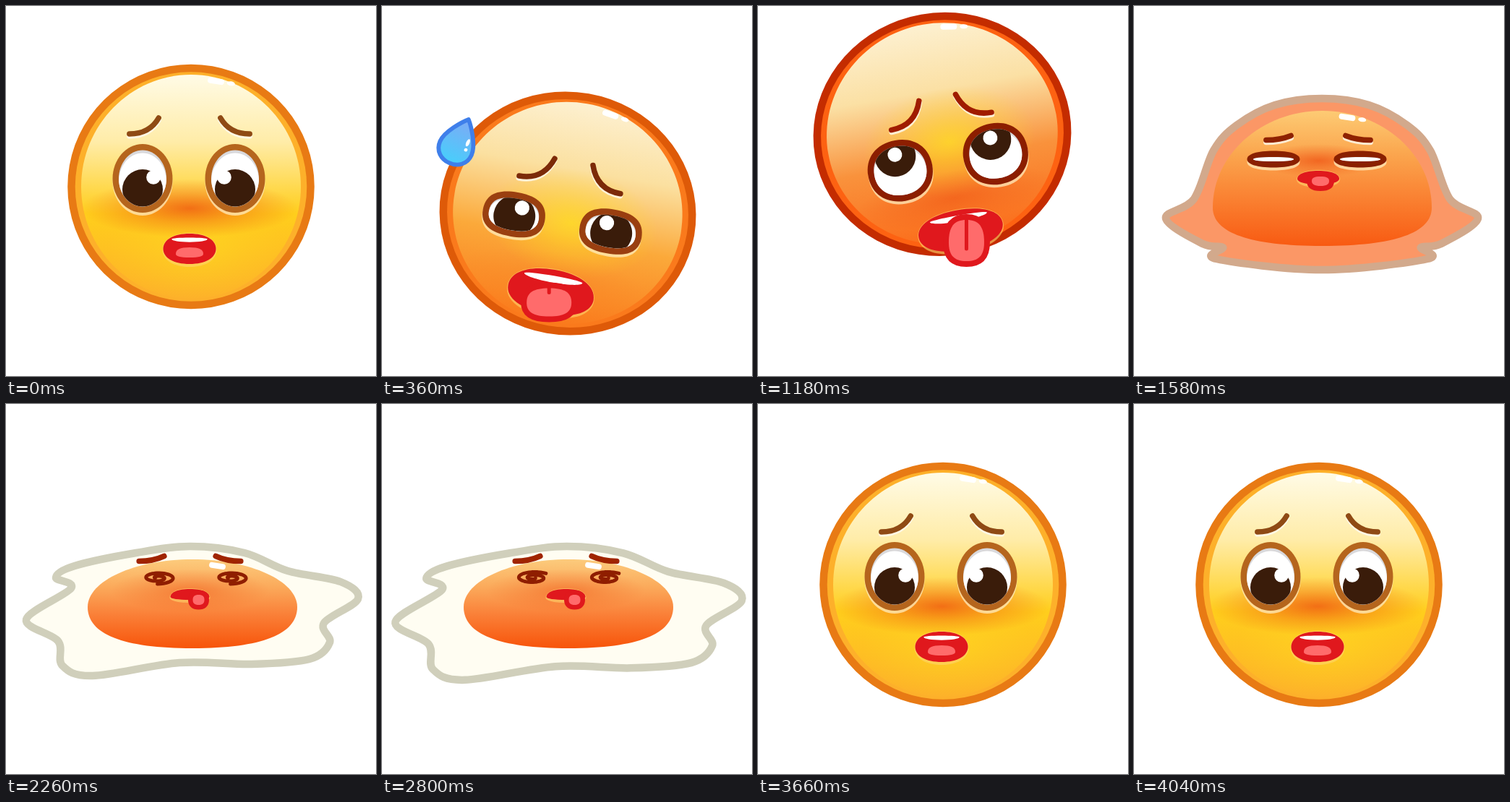
An HTML page with a canvas that plays this animation: 512 px wide and 512 px high, repeating every 4080 ms.

```html
<!DOCTYPE html>
<html lang="en">
<head>
<meta charset="utf-8">
<title>Melting face</title>
<style>
html, body { margin: 0; width: 100%; height: 100%; overflow: hidden; background: #fff; }
canvas { display: block; width: 512px; height: 512px; }
</style>
</head>
<body>
<canvas id="stage" width="512" height="512"></canvas>
<script>
const ctx = document.getElementById('stage').getContext('2d');
const LOOP = 4080, STEP = 20, RAD = Math.PI / 180;

// All outlines run clockwise from the top with the same point count, so they can morph.
const POINTS = 18;

function ring({ x, y, tilt, w, up }) {
  const c = Math.cos(tilt * RAD), s = Math.sin(tilt * RAD);
  return Array.from({ length: POINTS }, (_, i) => {
    const a = i / POINTS * 2 * Math.PI;
    const dx = (w + 13.5) * Math.sin(a), dy = -(up + 9) * Math.cos(a);
    return [x + dx * c - dy * s, y + dx * s + dy * c];
  });
}

function mirrored(x, top, side, bottom) {
  return [[x, top], ...side.map(([d, y]) => [x + d, y]), [x, bottom],
    ...side.map(([d, y]) => [x - d, y]).reverse()];
}

const melt = mirrored(260, 128, [[65, 137], [118, 165], [150, 200], [177, 267],
  [216, 294], [165, 329], [137, 334], [146, 350]], 365);
const white = [[255, 197], [330, 206], [390, 231], [463, 246], [487, 270], [440, 303],
  [448, 330], [420, 353], [340, 360], [240, 358], [120, 376], [78, 362], [72, 328],
  [28, 298], [90, 255], [69, 240], [95, 224], [180, 206]];
const wide = white.map(([x, y]) => [258 + (x - 257) * 1.075, 197 + (y - 197) * 1.055]);

// Feature positions are offsets from the middle of the body, in its tilted frame.
const calm = {
  body: { x: 256, y: 250, tilt: 0, w: 152, up: 155, down: 155, sag: .55 },
  edge: '#e87a14', fill: '#fdb02a', ink: '#b5651d', browInk: '#8f4a14',
  shades: ['#fffbe6', '#ffeca8', '#ffce1c', '#fdb02a'],
  blush: { y: 30, w: 150, alpha: .75 }, glow: { y: 85, alpha: .5 },
  lean: -2, shine: .8, open: 1,
  eyes: { x: -3, y: -11, gap: 64, w: 41.5, up: 48, down: 47, round: .55,
    gazeX: 0, gazeY: 15, pupil: 28, inward: 15, glintY: -2 },
  brows: { y: -84, gap: 63, worry: 11 },
  mouth: { y: 86, w: 36.5, up: 21, down: 21, teeth: 1 },
  tongue: { x: 0, y: 7, w: 19, up: 9, down: 5, rim: 0, cleft: 0 }
};
const woozy = {
  ...calm,
  body: { x: 257, y: 287, tilt: 10, w: 159, up: 154, down: 153, sag: .55 },
  edge: '#de5a08', fill: '#fa7a1c', ink: '#9a3f10', browInk: '#7c2a08',
  shades: ['#fdf0d0', '#fbe0a0', '#fba93a', '#fa7a1c'],
  blush: { y: 90, w: 130, alpha: .1 }, glow: { y: 12, alpha: .75 },
  lean: -4,
  eyes: { x: -5, y: 15.5, gap: 68, w: 43.5, up: 32, down: 29.5, round: .67,
    gazeX: 1, gazeY: 1, pupil: 29, inward: 8.5, glintY: -12 },
  brows: { y: -55.5, gap: 49, worry: 16 },
  mouth: { y: 112, w: 60, up: 32, down: 30, teeth: 1 },
  tongue: { x: 0, y: 14, w: 31, up: 20, down: 19, rim: 8, cleft: 6 }
};
const panting = {
  ...woozy,
  body: { x: 255, y: 299, tilt: -10, w: 160, up: 154, down: 152, sag: .55 },
  edge: '#c42c00', fill: '#fd6212', ink: '#8c1e00', browInk: '#a01c00',
  shades: ['#fdf0d0', '#fbe0a4', '#f9923c', '#fb6c1a'],
  blush: { y: 90, w: 140, alpha: .5 },
  lean: 2,
  eyes: { x: 1, y: 39.5, gap: 67, w: 45, up: 42.5, down: 42.5, round: .6,
    gazeX: -3.5, gazeY: -21, pupil: 28.5, inward: 0, glintY: -23 },
  brows: { y: -34.5, gap: 48, worry: 16.5 },
  mouth: { y: 135, w: 59, up: 28, down: 28, teeth: 1 },
  tongue: { x: 5, y: 18, w: 24.5, up: 31, down: 26, rim: 8, cleft: 40 }
};
const melting = {
  ...panting,
  body: { x: 260.5, y: 279, tilt: 0, w: 151.5, up: 134, down: 53, sag: .66 },
  edge: '#d2a98c', fill: '#fb9766', ink: '#8a2000', browInk: '#8f2200',
  shades: ['#fdcb74', '#fba850', '#fa8434', '#f85a12'],
  blush: { y: -65, w: 85, alpha: .7 }, glow: { y: -60, alpha: 0 },
  lean: -5.5,
  eyes: { x: -7.5, y: -67, gap: 60, w: 36.5, up: 11.5, down: 11.5, round: .62,
    gazeX: 0, gazeY: 0, pupil: 0, inward: 0, glintY: 0 },
  brows: { y: -96.5, gap: 55, worry: 3 },
  mouth: { y: -40, w: 29, up: 11, down: 8, teeth: 0 },
  tongue: { x: 3, y: 3, w: 12, up: 6, down: 7, rim: 7, cleft: 0 }
};
const egg = {
  ...melting,
  body: { x: 258, y: 281, tilt: 0, w: 145, up: 66, down: 57, sag: .66 },
  edge: '#d0cfbb', fill: '#fffdf2', ink: '#8f1e00', browInk: '#a02400',
  shades: ['#fccb7c', '#fbab5c', '#fa8038', '#f7540a'],
  blush: { y: -23, w: 110, alpha: .45 },
  lean: -3.5, shine: 0, open: 0,
  eyes: { ...melting.eyes, x: 2, y: -40.5, gap: 50.5, w: 27, up: 11, down: 11 },
  brows: { y: -67, gap: 53, worry: 3.5 },
  mouth: { y: -14, w: 27, up: 11, down: 4, teeth: 0 },
  tongue: { x: 12, y: 4, w: 8, up: 7, down: 7, rim: 6.5, cleft: 0 }
};
const swell = {
  ...egg,
  body: { x: 258.5, y: 283, tilt: 0, w: 151, up: 100, down: 57, sag: .8 },
  shades: ['#fddd88', '#fcb868', '#fa8844', '#f7540a'],
  blush: { y: -38, w: 95, alpha: .4 },
  shine: .9,
  eyes: { ...egg.eyes, x: -9.5, y: -54.5, gap: 54, w: 31, up: 18, down: 18 },
  brows: { y: -84, gap: 56, worry: 3.5 },
  mouth: { y: -26, w: 27, up: 10, down: 4, teeth: 0 },
  tongue: { ...egg.tongue, y: 0, w: 0, up: 0, down: 0, rim: 0 }
};
for (const face of [calm, woozy, panting]) face.outline = ring(face.body);
melting.outline = melt;
egg.outline = white;
swell.outline = wide;
const spread = { ...egg, outline: wide };

const poses = [[0, calm], [80, calm], [360, woozy], [400, woozy], [560, panting], [1180, panting],
  [1580, melting], [1820, egg], [2260, egg], [3220, spread], [3340, swell], [3380, swell],
  [3560, calm], [LOOP, calm]];

// start, end, shift down, squash
const bounces = [[40, 180, -28, -.02], [180, 340, 14, .03], [820, 980, 10, .03],
  [980, 1500, -130, 0], [1600, 1900, 0, .03], [3460, 3660, -43, 0],
  [3660, 3840, 62, .1], [3840, 3960, -30, -.02], [3960, 4040, 5, .01]];

// start, x, y, size
const drops = [[175, 121, 168, 68], [700, 145, 144, 61], [800, 377, 399, 46]];
const DROP_LIFE = 370;

const channels = hex => [1, 3, 5].map(i => parseInt(hex.slice(i, i + 2), 16));

function mix(a, b, k) {
  if (a === b) return a;
  if (typeof a === 'number') return a + (b - a) * k;
  if (typeof a === 'string') {
    return `rgb(${mix(channels(a), channels(b), k).map(Math.round)})`;
  }
  if (Array.isArray(a)) return a.map((v, i) => mix(v, b[i], k));
  return Object.fromEntries(Object.keys(a).map(n => [n, mix(a[n], b[n], k)]));
}

function poseAt(t) {
  const i = poses.findIndex(([start], n) => n && t < start);
  const [t0, a] = poses[i - 1], [t1, b] = poses[i];
  const k = (t - t0) / (t1 - t0);
  return mix(a, b, k * k * (3 - 2 * k));
}

function bounceAt(t) {
  const now = bounces.find(([t0, t1]) => t >= t0 && t < t1);
  if (!now) return [0, 0];
  const [t0, t1, shift, squash] = now;
  const arc = Math.sin((t - t0) / (t1 - t0) * Math.PI);
  return [shift * arc, squash * arc];
}

function layer(draw, alpha = 1) {
  if (alpha < .01) return;
  ctx.save();
  ctx.globalAlpha *= alpha;
  draw();
  ctx.restore();
}

function place(x, y, deg) {
  ctx.translate(x, y);
  ctx.rotate(deg * RAD);
}

function paint(color) {
  ctx.fillStyle = color;
  ctx.fill();
}

function stroke(color, width) {
  ctx.strokeStyle = color;
  ctx.lineWidth = width;
  ctx.stroke();
}

function dot(x, y, r, color) {
  ctx.beginPath();
  ctx.arc(x, y, r, 0, 7);
  paint(color);
}

// Two half ovals of different height around a shared waist.
function oval(x, y, w, up, down, k = .55, kDown = k) {
  ctx.beginPath();
  ctx.moveTo(x - w, y);
  ctx.bezierCurveTo(x - w, y - up * k, x - w * k, y - up, x, y - up);
  ctx.bezierCurveTo(x + w * k, y - up, x + w, y - up * k, x + w, y);
  ctx.bezierCurveTo(x + w, y + down * kDown, x + w * kDown, y + down, x, y + down);
  ctx.bezierCurveTo(x - w * kDown, y + down, x - w, y + down * kDown, x - w, y);
  ctx.closePath();
}

// Smooth closed curve through the points.
function blob(points) {
  const at = i => points[(i + POINTS) % POINTS];
  ctx.beginPath();
  ctx.moveTo(...points[0]);
  points.forEach((p, i) => {
    const next = at(i + 1);
    const near = p.map((v, d) => v + (next[d] - at(i - 1)[d]) / 6);
    const far = next.map((v, d) => v - (at(i + 2)[d] - p[d]) / 6);
    ctx.bezierCurveTo(...near, ...far, ...next);
  });
  ctx.closePath();
}

function haze(x, y, rx, ry, rgb, alpha) {
  layer(() => {
    ctx.translate(x, y);
    ctx.scale(rx, ry);
    const g = ctx.createRadialGradient(0, 0, 0, 0, 0, 1);
    [1, .45, 0].forEach((a, i) => g.addColorStop(i / 2, `rgba(${rgb},${a})`));
    ctx.fillStyle = g;
    ctx.fillRect(-1, -1, 2, 2);
  }, alpha);
}

function drawBody({ body, shades, glow, blush, lean }) {
  const { w, up, down, sag } = body;
  layer(() => {
    oval(0, 0, w, up, down, .55, sag);
    const g = ctx.createLinearGradient(0, -up, 0, down);
    [0, .3, .62, 1].forEach((s, i) => g.addColorStop(s, shades[i]));
    paint(g);
    ctx.clip();
    haze(8, glow.y, 120, 75, '255,224,32', glow.alpha);
    haze(lean, blush.y, blush.w, blush.w * .27, '238,78,16', blush.alpha);
  });
}

function drawGloss(up, dotAlpha) {
  layer(() => {
    place(34.5, 9 - up, 9);
    ctx.beginPath();
    ctx.moveTo(-7.5, 0);
    ctx.lineTo(7.5, 0);
    stroke('#fff', 8);
    layer(() => {
      oval(21, 0, 5.5, 3, 3);
      paint('#fff');
    }, dotAlpha);
  });
}

function drawEye(e, side, ink) {
  const rim = 8.5, w = e.w - rim, up = Math.max(2, e.up - rim), down = Math.max(2, e.down - rim);
  layer(() => {
    ctx.translate(e.x + side * e.gap, e.y);
    oval(0, 4, e.w, e.up, e.down, e.round);
    paint('rgba(255,236,190,.75)');
    oval(0, 0, e.w, e.up, e.down, e.round);
    paint(ink);
    oval(0, 0, w, up, down, e.round);
    paint('#d9d9dc');
    ctx.clip();
    oval(0, up * .1, w, up, down, e.round);
    paint('#fff');
    dot(e.gazeX, e.gazeY, e.pupil, '#3a1c0a');
    dot(e.gazeX - side * e.inward, e.glintY, e.pupil * .35, '#fff');
  });
}

function drawSpiral(e, side, ink, t) {
  const start = Math.PI / 2 + (t - 2260) / 1080 * 2.5 * Math.PI;
  const width = 1 + e.up * .35, w = e.w - width / 2, h = e.up - width / 2;
  layer(() => {
    ctx.translate(e.x + side * e.gap, e.y);
    ctx.beginPath();
    for (let s = 0; s <= 1; s += 1 / 64) {
      const r = 1 - .87 * s, a = start - s * 1.8 * 2 * Math.PI;
      ctx.lineTo(w * r * Math.cos(a), h * r * Math.sin(a));
    }
    stroke(ink, width);
  });
}

// More worry lifts, bends and lengthens the brow.
function drawBrow({ y, gap, worry }, side, p) {
  const half = 16 + worry * .38;
  const line = (drop, color) => {
    ctx.beginPath();
    ctx.moveTo(half, worry + drop);
    ctx.quadraticCurveTo(-worry * .7, worry + drop, -half, -worry + drop);
    stroke(color, 7.5);
  };
  layer(() => {
    ctx.translate(p.lean + side * gap, y);
    ctx.scale(side, 1);
    layer(() => line(3, '#fffaf0'), p.shine);
    line(0, p.browInk);
  });
}

function drawMouth({ mouth, tongue, lean, body }) {
  const { y, w, up, down, teeth } = mouth, red = '#e0181d', pink = '#ff6b6b';
  layer(() => {
    ctx.translate(lean, y);
    oval(0, 1, w + 1, up + 2, down + 3, .6);
    paint('rgba(255,214,110,.6)');
    oval(0, 0, w, up, down, .6);
    paint(red);
    layer(() => {
      oval(0, -up * .64, w * .68, up * .1, up * .2);
      paint('#fff');
    }, teeth);
    if (tongue.w < .5) return;
    place(tongue.x, tongue.y, -body.tilt);
    oval(0, 0, tongue.w, tongue.up, tongue.down, .7);
    if (tongue.rim > .1) stroke(red, tongue.rim * 2);
    paint(pink);
    if (tongue.cleft < 1) return;
    ctx.beginPath();
    ctx.moveTo(0, -tongue.up);
    ctx.lineTo(0, tongue.cleft - tongue.up);
    stroke(red, 5);
  });
}

function drawDrop([start, x, y, size], t) {
  const k = (t - start) / DROP_LIFE;
  if (k <= 0 || k >= 1) return;
  const s = size * Math.min(1, k * 2, (1 - k) * 5);
  layer(() => {
    place(x - 30 * k, y + 40 * k, 24);
    ctx.scale(s, s);
    ctx.beginPath();
    ctx.moveTo(0, -.5);
    ctx.bezierCurveTo(.1, -.4, .35, -.08, .35, .14);
    ctx.bezierCurveTo(.35, .58, -.35, .58, -.35, .14);
    ctx.bezierCurveTo(-.35, -.08, -.1, -.4, 0, -.5);
    ctx.closePath();
    const g = ctx.createLinearGradient(0, -.5, 0, .5);
    g.addColorStop(0, '#7fa9f5');
    g.addColorStop(1, '#45d0fc');
    paint(g);
    stroke('#3f7fea', .085);
    oval(.18, -.06, .035, .08, .08);
    paint('#fff');
    dot(.2, .09, .035, '#fff');
  });
}

function draw(t) {
  const p = poseAt(t), [shift, squash] = bounceAt(t);
  const { x, y, tilt, up } = p.body;
  ctx.clearRect(0, 0, 512, 512);
  ctx.lineCap = ctx.lineJoin = 'round';
  layer(() => {
    ctx.translate(256, 300 + shift);
    ctx.scale(1 + squash, 1 - squash);
    ctx.translate(-256, -300);
    blob(p.outline);
    paint(p.fill);
    stroke(p.edge, 10.5);
    layer(() => {
      place(x, y, tilt);
      drawBody(p);
      drawGloss(up, p.open);
      for (const side of [-1, 1]) {
        layer(() => drawEye(p.eyes, side, p.ink), p.open);
        layer(() => drawSpiral(p.eyes, side, p.ink, t), 1 - p.open);
        drawBrow(p.brows, side, p);
      }
      drawMouth(p);
    });
    drops.forEach(d => drawDrop(d, t));
  });
}

const begin = performance.now();
function tick() {
  const t = (performance.now() - begin) % LOOP;
  draw(Math.floor(t / STEP) * STEP);
  requestAnimationFrame(tick);
}
tick();
</script>
</body>
</html>
```
